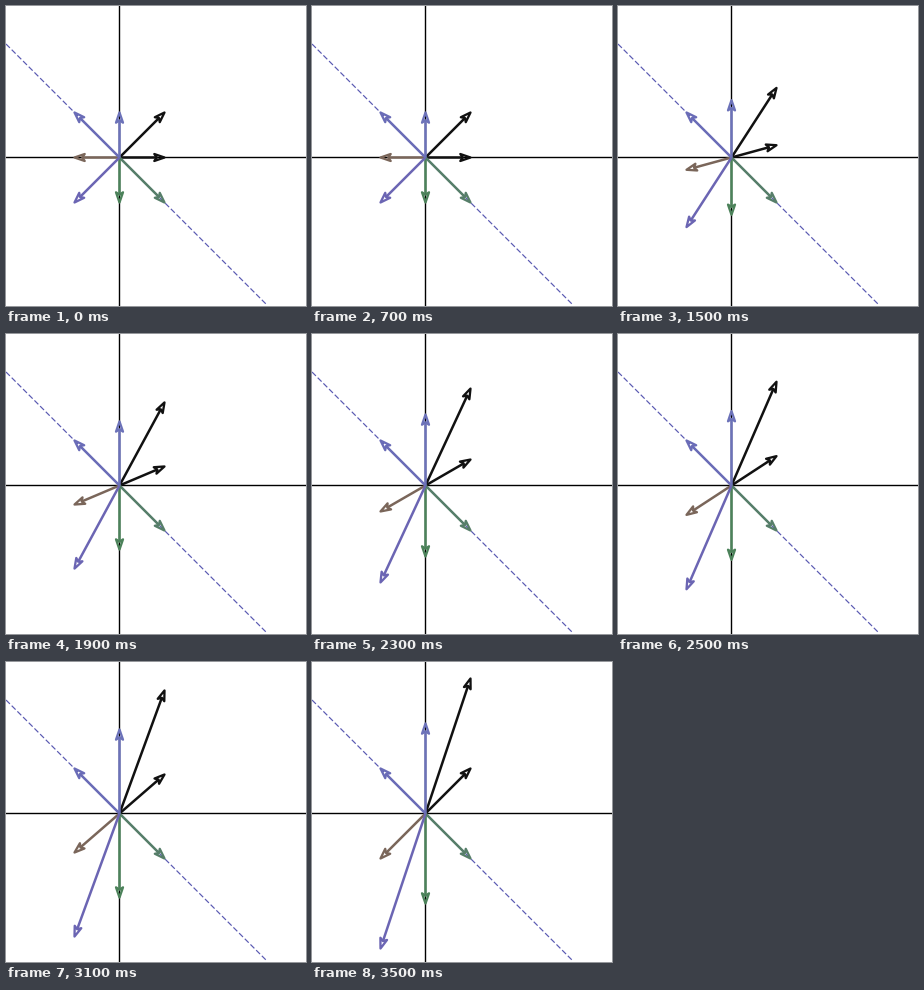
Recreate the animation shown at these times as a matplotlib script. Size 300x300 px, loop 4400 ms.

```python
import numpy as np
import matplotlib.pyplot as plt
from matplotlib.animation import FuncAnimation

SIZE, DPI = 300, 100
PX = 72 / DPI
FRAMES, START, STEPS = 44, 7, 28
ORIGIN = np.array([113.5, 151.5])
UNIT = 45
INK = "#111111"

VECTORS = [
    ((1, 0), INK),
    ((1, 1), INK),
    ((1, -1), "#567e69"),
    ((0, -1), "#4c825a"),
    ((-1, 0), "#7a665a"),
    ((-1, -1), "#6b65b3"),
    ((-1, 1), "#6a6cb7"),
    ((0, 1), "#6c72b9"),
]
# Hollow arrow head, with the tip at zero and pointing along +x
NECK = -7.8
HEAD = np.array([(0, 0), (-10.2, 3.5), (NECK, 0), (-10.2, -3.5)])

plt.rcParams["path.snap"] = False
fig = plt.figure(figsize=(SIZE / DPI, SIZE / DPI), dpi=DPI, facecolor="white")
ax = fig.add_axes([0, 0, 1, 1])
ax.set(xlim=(0, SIZE), ylim=(SIZE, 0))
ax.axis("off")

ax.axvline(ORIGIN[0], color="black", lw=1.4 * PX)
ax.axhline(ORIGIN[1], color="black", lw=1.4 * PX)
ax.plot([0, 261], [38, 299], color="#5a5ab2", lw=1.2 * PX,
        dashes=(4.6, 2.1), dash_capstyle="butt")

arrows = []
for vec, color in VECTORS:
    shaft, = ax.plot([], [], color=color, lw=2.5 * PX, solid_capstyle="butt", zorder=3)
    head = ax.fill(*HEAD.T, fc="none", ec=color, lw=2.3 * PX,
                   joinstyle="round", zorder=3)[0]
    arrows.append((np.array(vec), shaft, head))


def progress(i):
    """Nearly linear, a touch slower at both ends."""
    u = np.clip((i - START) / STEPS, 0, 1)
    return u - 0.08 * np.sin(2 * np.pi * u) / (2 * np.pi)


def update(i):
    s = progress(i)
    matrix = np.array([[1, 0], [s, 1 + s]])
    for vec, shaft, head in arrows:
        span = matrix @ vec * (UNIT, -UNIT)
        tip = ORIGIN + span
        c, d = span / np.hypot(*span)
        shaft.set_data(*zip(ORIGIN, tip + NECK * np.array([c, d])))
        head.set_xy(tip + HEAD @ np.array([[c, d], [-d, c]]))
    return [part for _, *parts in arrows for part in parts]


anim = FuncAnimation(fig, update, frames=FRAMES, interval=100,
                     repeat=True, repeat_delay=0)
plt.show()
```
